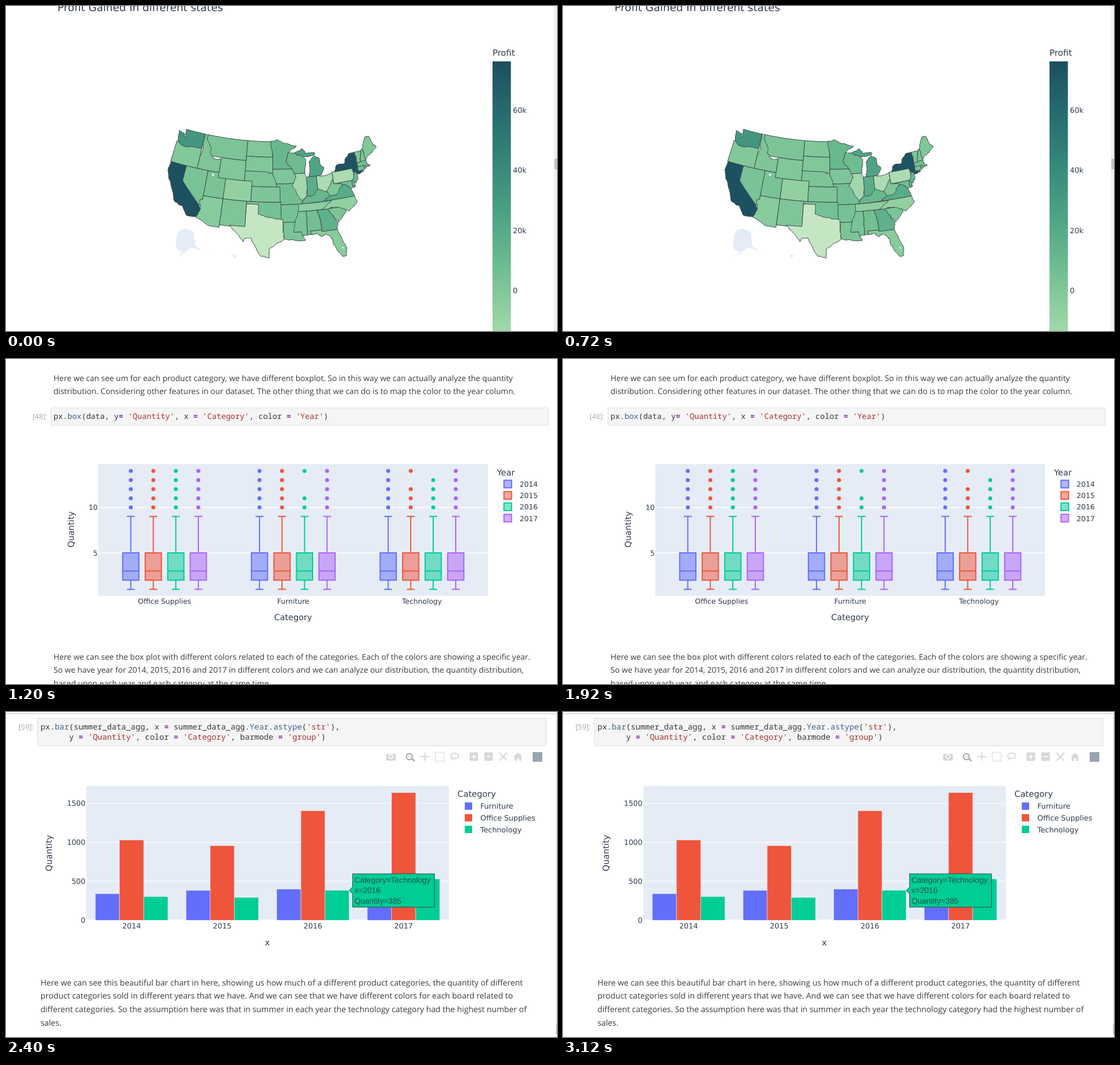
An HTML page that plays this animation: 974 by 575 pixels, repeating every 3.6 s.

```html
<!DOCTYPE html>
<html lang="en">
<head>
<meta charset="utf-8">
<title>Notebook charts</title>
<style>
html, body { margin: 0; width: 100%; height: 100%; overflow: hidden; background: #fff; }
svg { display: block; width: 974px; height: 575px; }
text { white-space: pre; text-rendering: geometricPrecision; }
.chart { font-family: "DejaVu Sans", sans-serif; fill: #2f3b4d; }
.prose { font-family: "Open Sans", "Noto Sans", sans-serif; fill: #3a3a3a; }
.code { font-family: "Noto Sans Mono", "DejaVu Sans Mono", monospace; fill: #383838; }
.tip { font-family: "Liberation Sans", Arial, sans-serif; fill: #27504a; }
.str { fill: #ad3030; }
.op { fill: #7d2aa8; font-weight: bold; }
.prop { fill: #3a608f; }
.prompt { fill: #a6a6a6; }
</style>
</head>
<body>
<svg id="stage" viewBox="0 0 974 575" xmlns="http://www.w3.org/2000/svg"></svg>
<script>
const HOLD = 1200;
const BLUE = '#636efa', RED = '#ef553b', GREEN = '#00cc96', VIOLET = '#ab63fa';
const PANEL = '#e5ecf6';
const SCALE = ['#c4e6c3', '#96d2a4', '#6dbc90', '#4da284', '#36877a', '#266b6e', '#1d4f60'];
const LOW = -25.7, HIGH = 76.4;

const rect = (x, y, w, h, fill, more = '') =>
  `<rect x="${x}" y="${y}" width="${w}" height="${h}" fill="${fill}" ${more}/>`;
const path = (d, fill, more = '') => `<path d="${d}" fill="${fill}" ${more}/>`;
const line = (d, color, width = 1) => path(d, 'none', `stroke="${color}" stroke-width="${width}"`);
const circle = (x, y, r, fill, more = '') => `<circle cx="${x}" cy="${y}" r="${r}" fill="${fill}" ${more}/>`;
const text = (x, y, size, s, cls = 'chart', anchor = 'start', more = '') =>
  `<text x="${x}" y="${y}" font-size="${size}" class="${cls}" text-anchor="${anchor}" ${more}>${s}</text>`;
const upright = (x, y, size, s) =>
  text(0, 0, size, s, 'chart', 'middle', `transform="translate(${x} ${y}) rotate(-90)"`);
const prose = (x, y, step, size, lines) =>
  lines.map((s, i) => text(x, y + i * step, size, s, 'prose')).join('');
const cell = (x, y, w, h) => rect(x, y, w, h, '#f5f5f5', 'stroke="#e0e0e0"');

// Marks strings, operators and attributes of a code line
const code = (x, y, size, s) => text(x, y, size, s.replace(/'[^']*'|=|\.\w+/g, m => {
  const cls = m[0] === "'" ? 'str' : m === '=' ? 'op' : 'prop';
  return m[0] === '.' ? `.<tspan class="prop">${m.slice(1)}</tspan>` : `<tspan class="${cls}">${m}</tspan>`;
}), 'code');

function shade(v) {
  const p = (v - LOW) / (HIGH - LOW) * 6, i = Math.min(5, Math.floor(p)), f = p - i;
  const part = (c, k) => parseInt(c.slice(1 + 2 * k, 3 + 2 * k), 16);
  return 'rgb(' + [0, 1, 2].map(k =>
    Math.round(part(SCALE[i], k) * (1 - f) + part(SCALE[i + 1], k) * f)) + ')';
}

// Albers equal-area projection of degrees west and north
const RAD = Math.PI / 180;
const S1 = Math.sin(29.5 * RAD), S2 = Math.sin(45.5 * RAD), CONE = (S1 + S2) / 2;
function project(west, north) {
  const r = 510 * Math.sqrt(1 + S1 * S2 - 2 * CONE * Math.sin(north * RAD)) / CONE;
  const a = CONE * (96 - west) * RAD;
  return [474.8 + r * Math.sin(a), r * Math.cos(a) - 321.9].map(v => v.toFixed(1)).join();
}

// Follows an edge; short oblique ones are rivers or coasts and waver
function edge([x, y], [x2, y2], steps = 6) {
  const dx = x2 - x, dy = y2 - y, wavy = dx && dy && Math.hypot(dx, dy) < 5;
  return Array.from({ length: steps }, (_, i) => {
    const u = x + dx * i / steps, v = y + dy * i / steps, amp = wavy && i ? 0.1 : 0;
    return project(u + amp * Math.sin(9 * u + 13 * v), v + amp * Math.sin(14 * u - 8 * v));
  }).join(' ');
}

function state(profit, outline) {
  const pts = outline.split(' ').map(p => p.split(',').map(Number));
  const d = pts.map((p, i) => edge(p, pts[(i + 1) % pts.length])).join(' ');
  return path(`M${d}Z`, shade(profit), 'stroke="#3a4a48" stroke-linejoin="round"');
}
const box = (profit, w, e, s, n) => state(profit, `${w},${n} ${e},${n} ${e},${s} ${w},${s}`);

// Later states cover the hidden edges of earlier ones
const country = () => [
  box(-1, 124.4, 117, 42, 46.3),
  state(33, '124.7,48.4 122.9,48 122.4,47.3 122.7,49 117,49 117,46 119,46 121.2,45.6 122.8,45.7 124,46.3'),
  box(2, 116, 104, 45, 49),
  state(1, '117,49 116,49 116,48 114.4,46.6 114.3,45.5 113,44.5 111,44.6 111,42 117,42 117,44.3 116.6,45.8'),
  box(3, 120, 114, 35, 42),
  state(-3, '114.7,36 114,36.2 114,37 109,37 109,31.3 111.1,31.3 114.8,32.5 114.1,34.3'),
  state(76, '124.2,42 120,42 120,39 114.6,35 114.1,34.3 114.7,32.7 117.1,32.5 118.4,34 120.6,34.6 122,36.8 123.8,39.2 124.4,40.4'),
  box(3, 114, 109, 37, 42),
  box(0, 111, 104, 41, 45),
  box(0, 104, 96.6, 45.9, 49),
  box(0, 104, 96.5, 42.8, 45.9),

  state(11, '97.2,49 95.2,49.4 93,48.6 89.6,48 92.1,46.7 92.8,45 91.2,43.5 96.5,43.5 96.5,46'),
  box(4, 94.5, 89.7, 33, 36.5),
  box(1, 96.5, 90.3, 40.6, 43.5),
  box(6, 95.6, 89, 36.5, 40.6),
  state(2, '104,43 98.5,43 96.5,42.5 95.4,40 104,40'),
  box(1, 102, 94.6, 37, 40),
  box(-7, 109, 102, 37, 41),
  box(1, 109, 103, 31.8, 37),
  box(5, 103, 94.4, 33.6, 37),
  state(2, '94,33 91,33 91,31 89.7,31 89,29.2 91.5,29.4 93.8,29.7'),
  state(LOW, '103,36.5 100,36.5 100,34.6 98,34.1 94,33.5 94,31.5 93.8,29.7 97.2,27.8 97.2,25.9 99.2,26.4 101.4,29.8 102.7,29.7 103.2,29 104.9,30.6 106.6,32 103,32'),

  box(18, 87.6, 84.8, 37.8, 41.7),
  state(-17, '84.8,41.7 82.7,41.5 80.5,42 80.5,38.4 84.8,38.4'),
  state(19, '83.7,36.6 75.9,36.6 76.3,38 78,39.5'),
  state(0, '82.6,38.4 80.6,40.6 80.5,39.7 77.8,39.5 78.9,38.8 80.3,37.5 82,37.5'),
  state(11, '89.4,36.5 83.7,36.6 82,37.5 82.6,38.4 84.8,39.1 86,38 88,37.8'),
  state(-13, '90.6,42.5 87.8,42.5 87.5,41.7 87.5,39.4 88,37.8 89.1,37 91.4,40.2 90.2,41.8'),
  state(8, '92.1,46.7 90.4,46.6 88,45.8 87.2,45.1 87.8,42.5 90.6,42.5 91.2,43.5 92.8,45'),
  state(24, '90.4,46.6 88,47.4 87,46.4 84.6,46.4 84.5,46 87,45.7 88,45.8'),
  state(24, '86.8,41.7 83.5,41.7 82.5,43 83.4,43.9 83.4,45.1 84.8,45.7 86.3,44.7 86.3,43'),

  box(-5, 90.1, 81.7, 35, 36.5),
  state(3, '90.2,35 88.2,35 88.4,30.3 89.6,30.2 89.7,31 91.6,31 91.1,33'),
  state(6, '88.2,35 85.6,35 85,32.3 85,31 87.6,31 87.5,30.3 88.4,30.3'),
  state(-3, '87.6,31 85,31 81.4,30.7 80,26.8 80.4,25.2 81.2,25.2 82.8,27.8 82.8,29 84,30.1 85.3,29.7 86,30.4 87.5,30.3'),
  state(2, '83.1,35 79,35 78.6,33.9 80.8,32.1'),
  state(16, '85.6,35 83.1,35 81,32.1 81.5,30.7 85,30.7 85,32.3'),
  state(-7, '84.3,35 81.7,36.6 75.9,36.6 75.6,35.3 77.9,33.9 79.7,34.8 81,35.1'),

  state(7, '79.4,39.7 75.8,39.7 75.1,38.4 76.3,38.2 77.4,39'),
  box(10, 75.8, 75.2, 38.4, 39.7),
  box(-16, 80.5, 74.9, 39.7, 42),
  state(10, '74.7,41.3 74,41 74,39.8 74.9,39 75.5,39.6 75,40.4'),
  state(74, '79.8,42 75.3,42 74.7,41.3 73.6,40.6 72,41 73.4,41.2 73.3,45 74.8,45 76.3,44 76.7,43.3 79,43.2'),
  state(2, '73.4,45 71.5,45 72.5,42.7 73.3,42.7'),
  state(2, '71.5,45 71,45.3 70.8,42.9 72.5,42.7'),
  state(0, '71,45.3 70,46.7 69.2,47.4 68.2,47.3 67.8,45.8 67,44.8 69,44 70.8,43.1'),
  state(7, '73.4,42.7 70.9,42.9 70.6,42 70,41.7 71.2,41.6 73.4,42'),
  box(4, 73.5, 71.8, 41.2, 42),
  box(7, 71.8, 71.2, 41.4, 42)
].join('');

function mapSlide() {
  let out = path('M302,405 308,396 318,394 332,399 335,425 348,433 326,427 316,436 303,444 313,434 304,432 300,424Z', PANEL);
  out += path('M400,438 409,442 403,446ZM392,435l5,1 -1,2ZM352,432l6,5 -3,-2Z', PANEL);
  out += country() + circle(366, 298.5, 2, '#f1f6f4') + circle(595.5, 427.5, 1.5, '#f1f6f4');
  out += text(91, 8.5, 18.7, 'Profit Gained In different states') + text(860, 88, 15.2, 'Profit');
  out += rect(860, 98, 32.5, 542, 'url(#ramp)');
  for (let v = 0; v <= 60; v += 20) out += text(896, 507.8 - v * 5.31, 13, v ? v + 'k' : '0');
  return out + rect(968, 0, 6, 575, '#f1f1f1') + rect(969.5, 270, 4.5, 19, '#c1c1c1');
}

function boxSlide() {
  const colors = [BLUE, RED, GREEN, VIOLET];
  const yAt = v => 423.5 - 16.1 * v;
  const oneBox = (x, c, dots) => {
    const half = 14.3, w = 2 * half;
    return line(`M${x},${yAt(9)}V${yAt(5)}M${x},${yAt(2)}V${yAt(1)}` +
        `M${x - 7},${yAt(9)}h14M${x - 7},${yAt(1)}h14`, c, 2) +
      rect(x - half, yAt(5), w, yAt(2) - yAt(5), c, `fill-opacity=".5" stroke="${c}" stroke-width="2"`) +
      line(`M${x - half},${yAt(3)}h${w}`, c, 2) +
      dots.map(v => circle(x, yAt(v), 3.5, c)).join('');
  };
  const all = [14, 13, 12, 11, 10];
  const rare = { '1,2': [14, 11, 10], '2,1': [14, 12, 11, 10], '2,2': [13, 12, 11, 10] };

  let out = prose(84, 38.5, 23.5, 14.02, [
    'Here we can see um for each product category, we have different boxplot. So in this way we can actually analyze the quantity',
    'distribution. Considering other features in our dataset. The other thing that we can do is to map the color to the year column.'
  ]);
  out += text(47, 106, 12.5, '[48]:', 'prose prompt') + cell(79.5, 86.5, 879, 31);
  out += code(84, 106, 13.73, "px.box(data, y= 'Quantity', x = 'Category', color = 'Year')");
  out += rect(163, 186, 689, 233, PANEL);
  [10, 5].forEach(v => {
    out += line(`M163,${yAt(v)}H852`, '#fff', 1.3);
    out += text(162, yAt(v) + 4.5, 12.6, v, 'chart', 'end');
  });
  ['Office Supplies', 'Furniture', 'Technology'].forEach((name, g) => {
    const x = 220.6 + g * 227.5;
    colors.forEach((c, i) => out += oneBox(x + i * 39.8, c, rare[[g, i]] || all));
    out += text(x + 59.7, 433, 12.6, name, 'chart', 'middle');
  });
  out += upright(119.5, 301.5, 14.8, 'Quantity');
  out += text(507.5, 462, 14.7, 'Category', 'chart', 'middle') + text(868, 206, 14.8, 'Year');
  colors.forEach((c, i) => {
    const y = 214.5 + i * 20.1;
    out += rect(880.3, y, 13.4, 13.4, c, `fill-opacity=".5" stroke="${c}" stroke-width="2"`);
    out += text(908, y + 11.7, 12.6, 2014 + i);
  });
  return out + prose(84, 531.5, 23.5, 14.02, [
    'Here we can see the box plot with different colors related to each of the categories. Each of the colors are showing a specific year.',
    'So we have year for 2014, 2015, 2016 and 2017 in different colors and we can analyze our distribution, the quantity distribution,',
    'based upon each year and each category at the same time.'
  ]);
}

function toolbar() {
  const g = '#d8d8d8', dark = '#adadad', mid = 79;
  const ring = (x, r, c, w) => circle(x, mid, r, 'none', `stroke="${c}" stroke-width="${w}"`);
  const tile = x => rect(x - 7.5, mid - 7.5, 15, 15, g, 'rx="1"') + line(`M${x - 4},${mid}h8`, '#fff', 2);
  return rect(672, 74, 17, 12, g, 'rx="2"') + ring(680.5, 3.6, '#fff', 1.6) +
    ring(713, 5.2, dark, 2.4) + line('M717,82l5,5', dark, 3) + line('M710.5,79h5', dark) +
    line('M733,79h15M740.5,71.5v15', g, 2) +
    rect(759, 71.5, 15.5, 15.5, 'none', `stroke="${g}" stroke-width="2" stroke-dasharray="2 2"`) +
    `<ellipse cx="793" cy="77.5" rx="7" ry="5" fill="none" stroke="${g}" stroke-width="1.8"/>` +
    line('M788,81q0,3 2,5', g, 1.8) +
    tile(827) + line('M827,75v8', '#fff', 2) + tile(853) +
    line('M872,72l14,14M886,72l-14,14', g, 2) +
    path('M897,79.5l8,-7.5 8,7.5h-2.3v7h-4v-4.5h-3.5v4.5h-4v-7z', g) +
    rect(931, 71, 17, 17, '#9aa3b0');
}

function barSlide() {
  const base = 368.3, yAt = v => base - v * 0.1377;
  const names = ['Furniture', 'Office Supplies', 'Technology'];
  const colors = [BLUE, RED, GREEN];
  const counts = [[340, 1030, 302], [382, 956, 292], [400, 1405, 385], [480, 1638, 530]];

  let out = rect(0, 2, 974, 2, '#dedede') + rect(972, 4, 2, 571, '#ececec') + rect(972.5, 551, 1.5, 18, '#b8b8b8');
  out += text(22, 30.5, 13, '[59]:', 'prose prompt') + cell(55.5, 10.5, 899, 49.5);
  out += code(61, 31, 14, "px.bar(summer_data_agg, x = summer_data_agg.Year.astype('str'),");
  out += code(111.4, 49, 14, "y = 'Quantity', color = 'Category', barmode = 'group')");
  out += toolbar() + rect(142, 131, 641, 237.3, PANEL);
  for (let v = 0; v <= 1500; v += 500) {
    out += line(`M142,${yAt(v)}H783`, '#fff', v ? 1.2 : 2);
    out += text(140.5, yAt(v) + 4.7, 12.9, v, 'chart', 'end');
  }
  counts.forEach((set, i) => {
    const x = 158 + i * 160.25;
    set.forEach((v, k) =>
      out += rect(x + k * 42.7, yAt(v), 42.7, base - yAt(v), colors[k], `stroke="${PANEL}" stroke-width=".6"`));
    out += text(x + 64, 383.3, 12.9, 2014 + i, 'chart', 'middle');
  });
  out += upright(81, 249.7, 15, 'Quantity') + text(462, 412.5, 15, 'x', 'chart', 'middle');
  out += text(798, 150, 14.9, 'Category');
  names.forEach((s, i) => {
    const y = 160 + i * 20.6;
    out += rect(811, y, 13, 13, colors[i]) + text(838.5, y + 11.3, 13, s);
  });
  out += path('M607,315.7L612.7,309.5V286.2H757.4V345.2H612.7V321.8Z', GREEN, 'stroke="#2f4a4a"');
  ['Category=Technology', 'x=2016', 'Quantity=385'].forEach((s, i) =>
    out += text(616, 302 + i * 18.4, 13.86, s, 'tip'));
  return out + prose(61, 483.5, 23.7, 14.28, [
    'Here we can see this beautiful bar chart in here, showing us how much of a different product categories, the quantity of different',
    'product categories sold in different years that we have. And we can see that we have different colors for each board related to',
    'different categories. So the assumption here was that in summer in each year the technology category had the highest number of',
    'sales.'
  ]);
}

const stage = document.getElementById('stage');
const stops = SCALE.map((c, i) => `<stop offset="${1 - i / 6}" stop-color="${c}"/>`).reverse().join('');
stage.innerHTML =
  `<defs><linearGradient id="ramp" x1="0" y1="0" x2="0" y2="1">${stops}</linearGradient></defs>` +
  [mapSlide, boxSlide, barSlide].map(make => `<g class="slide" display="none">${make()}</g>`).join('');
const slides = [...stage.querySelectorAll('.slide')];

function draw(t) {
  const now = Math.floor(t / HOLD) % slides.length;
  slides.forEach((s, i) => s.setAttribute('display', i === now ? 'inline' : 'none'));
}

const start = performance.now();
function tick() {
  draw(performance.now() - start);
  requestAnimationFrame(tick);
}
tick();
</script>
</body>
</html>
```
